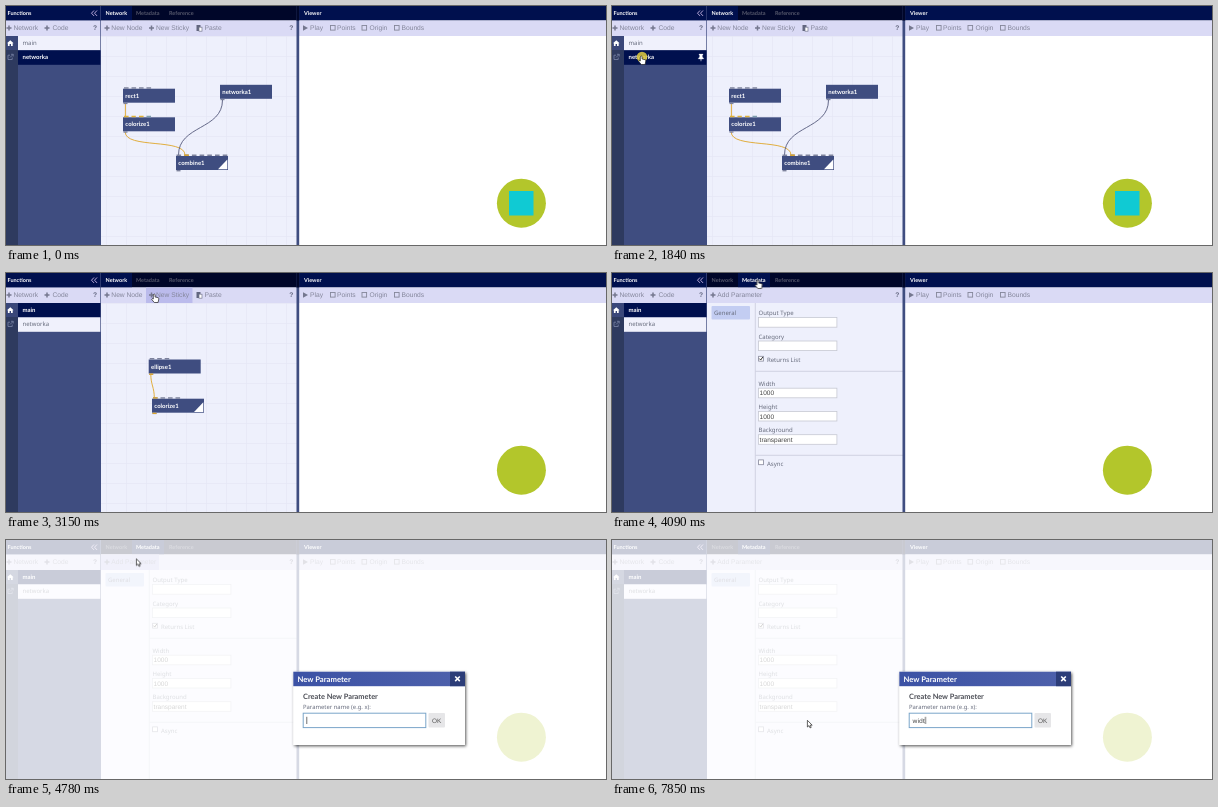
An HTML page that plays this animation: 600 by 239 pixels, repeating every 8 s.

```html
<!DOCTYPE html>
<html lang="en">
<head>
<meta charset="utf-8">
<title>Node editor</title>
<style>
html, body { margin: 0; width: 100%; height: 100%; overflow: hidden; background: #fff; }
svg { display: block; width: 100vw; height: 100vh; }
text { font: 6px "Noto Sans", "Open Sans", sans-serif; fill: #666b7c; text-rendering: geometricPrecision; white-space: pre; }
.tool text, .arial { font: 6.7px "Liberation Sans", Arial, sans-serif; fill: #84869b; }
.tool .help { font-weight: 700; fill: #62667f; }
.bold { font: 700 6px Lato, "Open Sans", sans-serif; fill: #fff; }
.head { font: 700 5.5px Lato, "Open Sans", sans-serif; fill: #fff; }
.dim { fill: #55586c; }
.plus { stroke: #75788f; stroke-width: 1.5; fill: none; }
.wire { fill: none; stroke: #dfa62a; stroke-width: .9; }
.field { fill: #fff; stroke: #c6c8d2; stroke-width: .8; }
.box { fill: #fff; stroke: #85879a; stroke-width: .8; }
.value { font-size: 6.5px; fill: #444; }
.rule { stroke: #cdd0df; stroke-width: .9; }

/* One loop is 8 s, so 1% is 80 ms */
.anim { animation: 8s step-end infinite; }
#mainList, #mainNet { animation-name: first; }
#subList { animation-name: second; }
#subNet { animation-name: subNet; }
#meta { animation-name: meta; }
#square { animation-name: first; }
#pin { animation-name: pin; }
#stickyHover { animation-name: sticky; }
#addHover { animation-name: add; }
#modal { animation-name: modal; }
#hand { animation-name: hand; }
#arrow { animation-name: arrow; }
#click { animation-name: click; }
#cursor { animation: move 8s linear infinite; }
#caret { animation-name: caret; }
#k1 { animation-name: k1; } #k2 { animation-name: k2; }
#k3 { animation-name: k3; } #k4 { animation-name: k4; }

@keyframes first { 0% { opacity: 1 } 23.875%, 100% { opacity: 0 } }
@keyframes second { 0% { opacity: 0 } 23.875%, 100% { opacity: 1 } }
@keyframes subNet { 0% { opacity: 0 } 23.875% { opacity: 1 } 43.25%, 100% { opacity: 0 } }
@keyframes meta { 0% { opacity: 0 } 43.25%, 100% { opacity: 1 } }
@keyframes pin { 0% { opacity: 0 } 20% { opacity: 1 } 33%, 100% { opacity: 0 } }
@keyframes sticky { 0% { opacity: 0 } 38.3% { opacity: 1 } 40.375%, 100% { opacity: 0 } }
@keyframes add { 0% { opacity: 0 } 55% { opacity: 1 } 64.875%, 100% { opacity: 0 } }
@keyframes modal { 0% { opacity: 0 } 58.875% { opacity: .5 } 59.75%, 100% { opacity: 1 } }
@keyframes hand { 0% { opacity: 0 } 19.5% { opacity: 1 } 58.875%, 100% { opacity: 0 } }
@keyframes arrow { 0% { opacity: 0 } 13.25% { opacity: 1 } 19.5% { opacity: 0 } 58.875%, 100% { opacity: 1 } }
@keyframes click {
  0% { opacity: 0 } 23% { opacity: .85 } 25.75% { opacity: 0 }
  42.25% { opacity: .85 } 46.25% { opacity: 0 }
  56.875% { opacity: .85 } 58.875%, 100% { opacity: 0 }
}
@keyframes move {
  0%, 13.25% { transform: translate(407px, 217px); animation-timing-function: ease-in-out }
  20.875%, 31.6% { transform: translate(29px, 50px); animation-timing-function: ease-in-out }
  39.375%, 40.3% { transform: translate(148px, 21px) }
  41.25%, 52.25% { transform: translate(145.5px, 7px); animation-timing-function: ease-in-out }
  56.875%, 64% { transform: translate(130px, 18.5px); animation-timing-function: ease-in-out }
  68.625%, 100% { transform: translate(195px, 180px) }
}
@keyframes caret {
  0% { opacity: 1; transform: none }
  65.8% { opacity: 0; transform: none }
  76.625% { opacity: 1; transform: translateX(5.1px) }
  82.5% { opacity: 1; transform: translateX(6.7px) }
  89.5% { opacity: 1; transform: translateX(10.5px) }
  95.25% { opacity: 0; transform: translateX(10.5px) }
  98.125%, 100% { opacity: 1; transform: translateX(12.7px) }
}
@keyframes k1 { 0% { fill-opacity: 0 } 76.625%, 100% { fill-opacity: 1 } }
@keyframes k2 { 0% { fill-opacity: 0 } 82.5%, 100% { fill-opacity: 1 } }
@keyframes k3 { 0% { fill-opacity: 0 } 89.5%, 100% { fill-opacity: 1 } }
@keyframes k4 { 0% { fill-opacity: 0 } 98.125%, 100% { fill-opacity: 1 } }
</style>
</head>
<body>
<svg viewBox="0 0 600 239" preserveAspectRatio="none">
  <defs>
    <pattern id="grid" x="100" y="30" width="20" height="20" patternUnits="userSpaceOnUse">
      <path d="M.5 0V20M0 .5H20" stroke="#e5e7f5" stroke-width=".7"/>
    </pattern>
    <linearGradient id="bar" x1="0" x2="1">
      <stop stop-color="#3c52a5"/><stop offset="1" stop-color="#4e61ab"/>
    </linearGradient>
    <filter id="shadow" x="-10%" y="-20%" width="120%" height="140%">
      <feDropShadow dx="1" dy="1.2" stdDeviation="1.6" flood-opacity=".65"/>
    </filter>
    <path id="plus" class="plus" d="M-2.5 0H2.5M0 -2.5V2.5"/>
    <g id="node">
      <rect width="52" height="14" fill="#3f4d80"/>
      <path d="M.5 14.7H4.5" stroke="#7d829c" stroke-width="1.4"/>
    </g>
    <path id="corner" d="M51.3 3.5V13.2H42Z" fill="#fff"/>
    <path id="ports" d="M1 -.8H29" stroke="#7d829c" stroke-width="1.5" stroke-dasharray="4.6 2.9"/>
    <g id="colorPorts" stroke-width="1.5">
      <path d="M1 -.8H12.8" stroke="#dfb23a" stroke-dasharray="4.6 2.9"/>
      <path d="M16 -.8H20.6" stroke="#dfb23a"/>
      <path d="M23.5 -.8H28" stroke="#7f9fae"/>
    </g>
  </defs>

  <!-- Viewer -->
  <rect x="293" width="307" height="239" fill="#fff"/>
  <rect x="293" width="307" height="14.5" fill="#00104e"/>
  <text class="head" x="298" y="9.3">Viewer</text>
  <g class="tool">
    <rect x="293" y="14.5" width="307" height="15.5" fill="#dadaf5"/>
    <path d="M297 19.2L302 22L297 24.8Z" fill="#75788f"/>
    <text x="304" y="24.3">Play</text>
    <g fill="none" stroke="#85879a" stroke-width=".9">
      <rect x="324.5" y="19.5" width="4.6" height="4.6"/>
      <rect x="356" y="19.5" width="4.6" height="4.6"/>
      <rect x="388.5" y="19.5" width="4.6" height="4.6"/>
    </g>
    <text x="331" y="24.3">Points</text>
    <text x="363.5" y="24.3">Origin</text>
    <text x="395.5" y="24.3">Bounds</text>
  </g>
  <circle cx="515.4" cy="197.2" r="24.5" fill="#b3c62b"/>
  <rect id="square" class="anim" x="503" y="185" width="24.5" height="24.5" fill="#10cad3"/>

  <!-- Functions -->
  <rect width="95" height="239" fill="#3f4d80"/>
  <rect width="94.3" height="14.5" fill="#00104e"/>
  <text class="head" x="1.5" y="9.3">Functions</text>
  <path d="M88 4.5L85.5 7.2L88 9.9M91 4.5L88.5 7.2L91 9.9" fill="none" stroke="#b9a8d8"/>
  <g class="tool">
    <rect y="14.5" width="94.3" height="15.5" fill="#dadaf5"/>
    <use href="#plus" x="3" y="22"/><text x="7.5" y="24.3">Network</text>
    <use href="#plus" x="41" y="22"/><text x="46.5" y="24.3">Code</text>
    <text class="help" x="87" y="24.3">?</text>
  </g>
  <rect y="30" width="12" height="209" fill="#2e3a5f"/>
  <rect y="30" width="12" height="14" fill="#3a4779"/>
  <path d="M1 37.2L4.3 34.2L7.6 37.2H6.7V40H5V38H3.6V40H1.9V37.2Z" fill="#fff"/>
  <path d="M4 49.2H2V53.5H6.2V51.5M4 51.5L7 48.5M5 48.3H7.2V50.5" fill="none" stroke="#7c86a8" stroke-width=".8"/>
  <g id="mainList" class="anim">
    <rect x="12" y="30" width="82.3" height="14.3" fill="#f0f1fc"/>
    <rect x="12" y="44.3" width="82.3" height="14.5" fill="#00104e"/>
    <text x="16.5" y="39.3">main</text>
    <text class="bold" x="16.5" y="53.3">networka</text>
  </g>
  <g id="subList" class="anim">
    <rect x="12" y="30" width="82.3" height="14.3" fill="#00104e"/>
    <rect x="12" y="44.3" width="82.3" height="14.5" fill="#f0f1fc"/>
    <text class="bold" x="16.5" y="39.3">main</text>
    <text x="16.5" y="53.3">networka</text>
  </g>
  <path id="pin" class="anim" d="M87 48H91V49H90.4V51L91.6 52.3V53H89.4L89 55.3L88.6 53H86.4V52.3L87.6 51V49H87Z" fill="#fff" stroke="#c5c8d8" stroke-width=".3"/>

  <!-- Network panel -->
  <rect x="95" width="196" height="239" fill="#eef0fc"/>
  <rect x="95" y="30" width="196" height="209" fill="url(#grid)"/>
  <rect x="95" width="196" height="14.5" fill="#000629"/>
  <rect x="95" width="31" height="14.5" fill="#00104e"/>
  <text class="head" x="99.5" y="9.3">Network</text>
  <text class="head dim" x="130" y="9.3">Metadata</text>
  <text class="head dim" x="163" y="9.3">Reference</text>
  <g class="tool">
    <rect x="95" y="14.5" width="196" height="15.5" fill="#dadaf5"/>
    <rect id="stickyHover" class="anim" x="140" y="14.5" width="46.5" height="15.5" fill="#bbbbec"/>
    <use href="#plus" x="101" y="22"/><text x="105.3" y="24.3">New Node</text>
    <use href="#plus" x="145.5" y="22"/><text x="150" y="24.3">New Sticky</text>
    <path d="M190.5 19H194.5V21H193V25H190.5Z" fill="#62667f"/>
    <rect x="193" y="21.2" width="3" height="4" fill="#fff" stroke="#75788f" stroke-width=".7"/>
    <text x="198.5" y="24.3">Paste</text>
    <text class="help" x="283.3" y="24.3">?</text>
  </g>

  <g id="mainNet" class="anim">
    <path class="wire" d="M119.4 98V110M119.2 126C119.2 143 179 132 179 149"/>
    <path class="wire" style="stroke:#555a7c" d="M216.5 94C216.5 124 172.5 119 172.5 149"/>
    <g transform="translate(117 82.7)"><use href="#node"/><use href="#ports"/><text class="bold" x="2.3" y="9">rect1</text></g>
    <g transform="translate(117 111.3)"><use href="#node"/><use href="#colorPorts"/><text class="bold" x="2.3" y="9">colorize1</text></g>
    <g transform="translate(214 78.8)"><use href="#node"/><text class="bold" x="2.3" y="9">networka1</text></g>
    <g transform="translate(170 150)">
      <use href="#node"/><use href="#corner"/>
      <path d="M.5 -.8H52" stroke="#7d829c" stroke-width="1.5" stroke-dasharray="4.6 3.1"/>
      <path d="M8.2 -.8H12.8" stroke="#dfa62a" stroke-width="1.5"/>
      <text class="bold" x="2.3" y="9">combine1</text>
    </g>
  </g>

  <g id="subNet" class="anim">
    <path class="wire" d="M144.8 101C144.8 112 148.3 114 148.3 125"/>
    <g transform="translate(142.7 86.5)"><use href="#node"/><path d="M1 -.8H20.5" stroke="#7d829c" stroke-width="1.5" stroke-dasharray="4.6 2.9"/><path d="M.5 14.7H4.5" stroke="#dfa62a" stroke-width="1.4"/><text class="bold" x="2.3" y="9">ellipse1</text></g>
    <g transform="translate(146 125.7)"><use href="#node"/><use href="#corner"/><use href="#ports"/><path d="M1 -.8H5.6M.5 14.7H4.5" stroke="#dfa62a" stroke-width="1.4"/><text class="bold" x="2.3" y="9">colorize1</text></g>
  </g>

  <g id="meta" class="anim">
    <rect x="95" width="196" height="239" fill="#eef0fc"/>
    <rect x="95" width="196" height="14.5" fill="#000629"/>
    <rect x="126" width="32" height="14.5" fill="#00104e"/>
    <text class="head dim" x="99.5" y="9.3">Network</text>
    <text class="head" x="130" y="9.3">Metadata</text>
    <text class="head dim" x="163" y="9.3">Reference</text>
    <g class="tool">
      <rect x="95" y="14.5" width="196" height="15.5" fill="#dadaf5"/>
      <rect id="addHover" class="anim" x="95" y="14.5" width="58" height="15.5" fill="#bbbbec"/>
      <use href="#plus" x="101" y="22"/><text x="105.3" y="24.3">Add Parameter</text>
      <text class="help" x="283.3" y="24.3">?</text>
    </g>
    <rect x="99.5" y="33" width="38.5" height="13.5" rx="1" fill="#c3cdf2"/>
    <text x="102" y="42">General</text>
    <path class="rule" d="M143.3 30V239M143.3 98.3H291M143.3 182.3H291"/>
    <text x="146.5" y="42.3">Output Type</text>
    <rect class="field" x="146.4" y="44.6" width="78.5" height="9.6"/>
    <text x="146.5" y="65.6">Category</text>
    <rect class="field" x="146.4" y="68" width="78.5" height="9.6"/>
    <rect class="box" x="146.6" y="83.3" width="4.8" height="4.8"/>
    <path d="M147.4 85.6L148.7 87L150.8 84" fill="none" stroke="#333"/>
    <text x="155" y="88.6">Returns List</text>
    <text x="146.5" y="112.6">Width</text>
    <rect class="field" x="146.4" y="115.2" width="78.5" height="9.6"/>
    <text class="arial value" x="147.6" y="122.3">1000</text>
    <text x="146.5" y="135.9">Height</text>
    <rect class="field" x="146.4" y="138.4" width="78.5" height="9.6"/>
    <text class="arial value" x="147.6" y="145.5">1000</text>
    <text x="146.5" y="159.2">Background</text>
    <rect class="field" x="146.4" y="161.7" width="78.5" height="9.6"/>
    <text class="arial value" x="147.6" y="168.7">transparent</text>
    <rect class="box" x="146.6" y="186.9" width="4.8" height="4.8"/>
    <text x="155" y="192.5">Async</text>
  </g>

  <rect x="290.5" width="2.7" height="239" fill="#3f4d80"/>
  <rect x="290.5" width="2.7" height="14.5" fill="#000629"/>

  <!-- Dialog -->
  <g id="modal" class="anim">
    <rect width="600" height="239" fill="#fff" opacity=".79"/>
    <rect x="287.3" y="131.7" width="171.7" height="73.3" fill="#fff" filter="url(#shadow)"/>
    <rect x="287.3" y="131.7" width="171.7" height="14.5" fill="url(#bar)"/>
    <rect x="444" y="131.7" width="15" height="14.5" fill="#2c3d78"/>
    <path d="M449.2 136.5L453.8 141.1M453.8 136.5L449.2 141.1" stroke="#fff" stroke-width="1.6"/>
    <text class="bold" style="font-size:7.7px" x="291.5" y="141.7">New Parameter</text>
    <text class="bold" style="font-size:7.4px;fill:#4b4d55" x="297" y="158.5">Create New Parameter</text>
    <text style="font-size:5.9px" x="297" y="168.8">Parameter name (e.g. x):</text>
    <rect x="297.2" y="173.2" width="122.6" height="14.4" fill="#fff" stroke="#7ba5c9"/>
    <text x="300.5" y="182.5" style="font-size:6.2px;fill:#444"><tspan id="k1" class="anim">w</tspan><tspan id="k2" class="anim">i</tspan><tspan id="k3" class="anim">d</tspan><tspan id="k4" class="anim">t</tspan></text>
    <rect id="caret" class="anim" x="300.5" y="176.8" width=".7" height="7.2" fill="#333"/>
    <rect x="422.5" y="173" width="16.5" height="14.6" rx="1" fill="#e6e6e8"/>
    <text class="arial" style="font-size:6.4px;fill:#555" x="426" y="182.6">OK</text>
  </g>

  <!-- Pointer -->
  <g id="cursor">
    <circle id="click" class="anim" cx="1" cy="1" r="5.3" fill="#e3cf3f"/>
    <path id="hand" class="anim" d="M-.7 .6Q.3 -.6 1.1 .6V3L4.2 3.7Q5 4 4.8 5L4.1 8.5H.3L-2.4 5.3Q-2 4.2 -.7 5Z" fill="#fff" stroke="#222" stroke-width=".7"/>
    <path id="arrow" class="anim" d="M.4 .3V7L2 5.6L3 7.9L4.2 7.4L3.2 5.2H5.2Z" fill="#fff" stroke="#222" stroke-width=".7"/>
  </g>
</svg>
</body>
</html>
```
